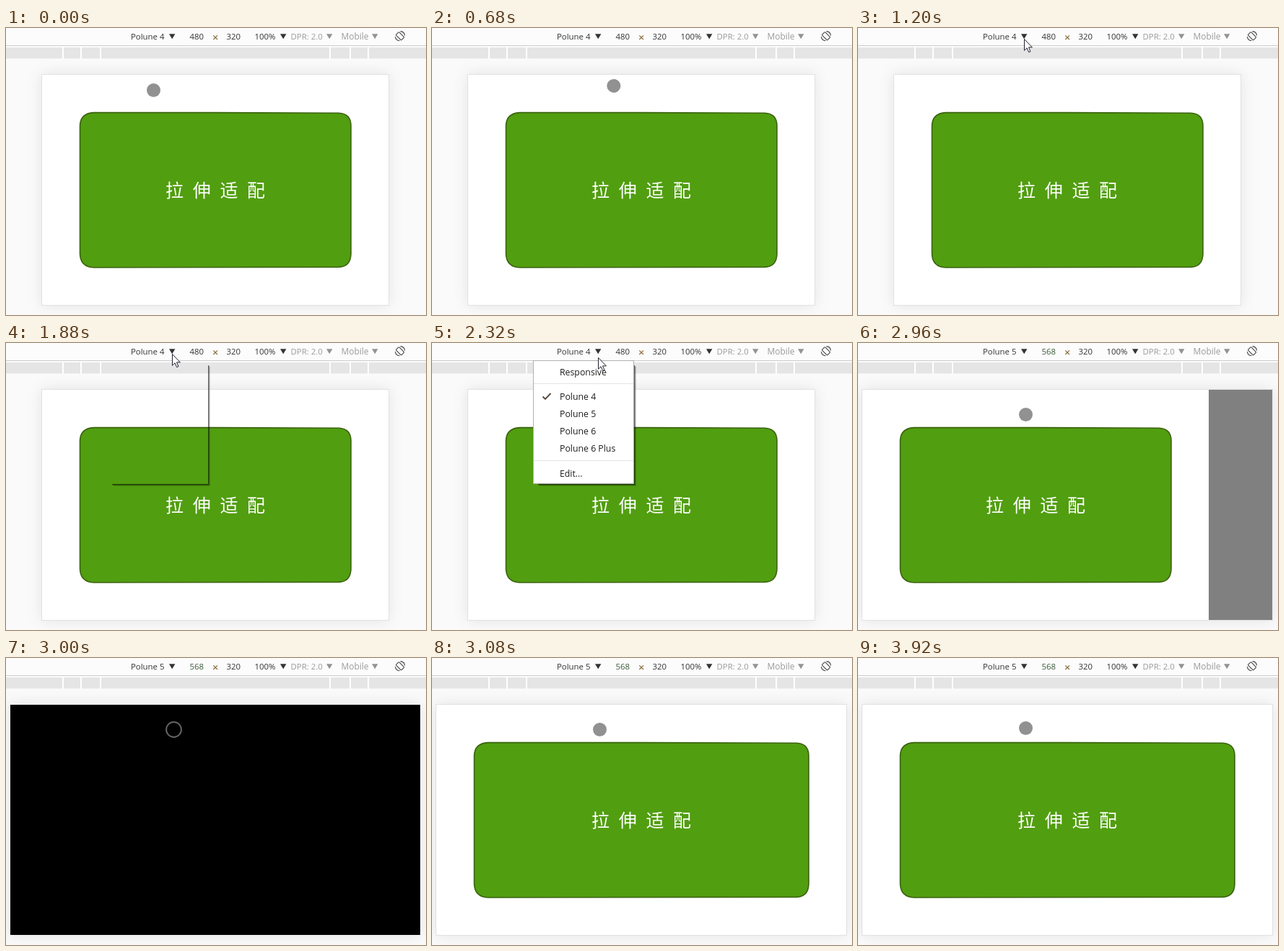
An HTML page that plays this animation: 582 px wide and 399 px high, repeating every 4.72 s.

```html
<!DOCTYPE html>
<html lang="zh-CN">
<head>
<meta charset="utf-8">
<title>拉伸适配</title>
<style>
  html, body { margin: 0; width: 100%; height: 100%; overflow: hidden; background: #fafafa; }
  svg { display: block; width: 582px; height: 399px; }
  text { font: 11.4px "Open Sans", "Noto Sans", sans-serif; fill: #333; white-space: pre; }
  .dim { fill: #9b9b9b; }
  #menu text { font-size: 12.3px; fill: #1c1c1c; }
  #label text { font: 500 25px "Noto Sans CJK SC", "Noto Sans CJK", sans-serif; fill: #fff; text-anchor: middle; }
  #page { filter: drop-shadow(0 0 10px rgba(0, 0, 0, .1)); }
</style>
</head>
<body>
<svg viewBox="0 0 582 399">
  <rect id="page" y="65" height="320" fill="#fff"/>
  <rect id="edge" y="64.5" height="321" fill="none" stroke="#e2e2e2"/>
  <rect id="strip" x="486" y="65" width="88" height="320" fill="#808080"/>
  <path id="card" fill="#519e10" stroke="#3b620f" stroke-width="1.6"/>
  <g id="label"></g>

  <rect width="582" height="43" fill="#fcfcfc"/>
  <path d="M0 24.5H582" stroke="#cbcbcb"/>
  <rect y="27" width="582" height="15.5" fill="#e5e5e5"/>
  <path d="M79 26V43M104 26V43M131 26V43M449 26V43M477 26V43M502 26V43" stroke="#fff" stroke-width="2"/>
  <g id="bar"></g>
  <path d="M287.3 10.3L293 16M293 10.3L287.3 16" stroke="#8d6f3c" stroke-width="1.2"/>
  <g fill="none" stroke="#444" stroke-width="1.1">
    <rect x="543" y="6" width="6" height="10.5" rx="1" transform="rotate(-45 546 11.2)"/>
    <path d="M546.5 4.6Q552 5 552.6 10.5M539.4 12Q540 17.2 545.5 17.8"/>
  </g>

  <g id="shadow" fill="none" stroke="#000"></g>
  <g id="menu">
    <rect x="140.5" y="24.5" width="139" height="171" fill="#fff" stroke="#b0b0b0"/>
    <rect id="hover" x="141" width="138" height="24" fill="#e9ebeb"/>
    <path d="M141 56.5H279M141 163.5H279" stroke="#e4e4e4"/>
    <path d="M153.5 74.5L157 78L164.5 70" fill="none" stroke="#594840" stroke-width="1.9"/>
  </g>

  <circle id="touch"/>
  <path id="arrow" d="M.5 .5V16.2L4.1 12.8L6.6 18.6L9 17.6L6.5 11.9H11.4Z" fill="#fff" stroke="#20222e"/>
</svg>
<script>
const LOOP = 4720, STEP = 40;
const $ = id => document.getElementById(id);

function add(parent, tag, attrs, content = "") {
  const el = document.createElementNS("http://www.w3.org/2000/svg", tag);
  set(el, attrs);
  el.textContent = content;
  $(parent).append(el);
  return el;
}
function set(el, attrs) {
  for (const key in attrs) el.setAttribute(key, attrs[key]);
}
const show = (id, on) => $(id).setAttribute("visibility", on ? "visible" : "hidden");

// Toolbar
const word = (x, s, cls = "") => add("bar", "text", { x, y: 16, class: cls }, s);
const device = word(173, "Polune 4");
const size = word(254.5, "480");
word(305.5, "320");
word(344.5, "100%");
word(394.5, "DPR: 2.0", "dim");
word(464.5, "Mobile", "dim").style.fontSize = "11.9px";
for (const [x, fill] of [[226, "#333"], [380, "#333"], [444, "#939393"], [507, "#939393"]])
  add("bar", "path", { d: `M${x} 8.2h8.4l-4.2 7z`, fill });

// Menu rows: top edge and caption
const rows = [[28, "Responsive"], [62, "Polune 4"], [86, "Polune 5"], [110, "Polune 6"],
  [134, "Polune 6 Plus"], [169, "Edit..."]];
for (const [y, s] of rows) add("menu", "text", { x: 177, y: y + 17 }, s);
[.6, .4, .16].forEach((opacity, i) =>
  add("shadow", "path", { d: `M${280.5 + i} ${31 + i}V${196.5 + i}H${147 + i}`, opacity }));

[..."拉伸适配"].forEach((s, i) => add("label", "text", { x: 233.5 + i * 37.7, y: 234.5 }, s));

const ease = p => p * p * (3 - 2 * p);
const mix = (a, b, p) => a + (b - a) * p;
const curve = (a, b, c, p) => mix(mix(a, b, p), mix(b, c, p), p);

// Pointer position at time t
function pointer(t) {
  if (t < 600) return [204.5, 86.5];
  if (t < 1200) {
    const p = ease(Math.min(1, (t - 560) / 560));
    return [curve(204.5, 430, 232, p), curve(86.5, 62, 15, p)];
  }
  if (t < 2320) return [230, 15];
  if (t < 2960) {
    const p = ease(Math.min(1, (t - 2280) / 280));
    return [mix(230, 232, p), mix(15, 98, p)];
  }
  return [232.5, t < 3880 ? 99.5 : t < 3920 ? 98.5 : 97.5];
}

function cardPath(l, r) {
  return `M${l + 19} 117.6L${(l + r) / 2} 117.6L${r - 17} 118.2Q${r} 119 ${r} 136V314` +
    `Q${r - .5} 332 ${r - 17} 332.4L${l + 19} 333Q${l + .5} 332 ${l} 314V136Q${l + .5} 118.5 ${l + 19} 117.6Z`;
}

function draw(now) {
  const t = Math.floor(now % LOOP / STEP) * STEP;
  const wide = t >= 2960, black = t >= 3000 && t < 3080, stale = wide && t < 3000;
  const x = wide ? 6 : 50, w = wide ? 568 : 480;
  const left = wide ? 58.5 : 102.5;

  device.textContent = wide ? "Polune 5" : "Polune 4";
  size.textContent = w;
  size.style.fill = wide ? "#3a5a38" : "#333";

  set($("page"), { x, width: w, fill: black ? "#000" : "#fff" });
  set($("edge"), { x: x - .5, width: w + 1 });
  set($("card"), { d: cardPath(left, left + (wide && !stale ? 463.5 : 375.5)) });
  set($("label"), { transform: `translate(${stale ? -44 : 0} 0)` });
  show("strip", stale);
  show("edge", !black);
  show("card", !black);
  show("label", !black);

  const [px, py] = pointer(t);
  const open = t >= 1920 && !wide;
  const row = rows.find(([y]) => py >= y && py < y + 24);
  show("shadow", t >= 1880 && !wide);
  show("menu", open);
  show("hover", open && row);
  if (row) set($("hover"), { y: row[0] });

  const touching = wide || (t < 1200 && py >= 65);
  show("touch", touching);
  show("arrow", !touching);
  set($("touch"), black
    ? { cx: px, cy: py, r: 10.4, fill: "none", stroke: "#636363", "stroke-width": 2 }
    : { cx: px, cy: py, r: 9.5, fill: "#919191", stroke: "none" });
  set($("arrow"), { transform: `translate(${Math.round(px)} ${Math.round(py)})` });
}

function tick() {
  draw(performance.now());
  requestAnimationFrame(tick);
}
tick();
</script>
</body>
</html>
```
